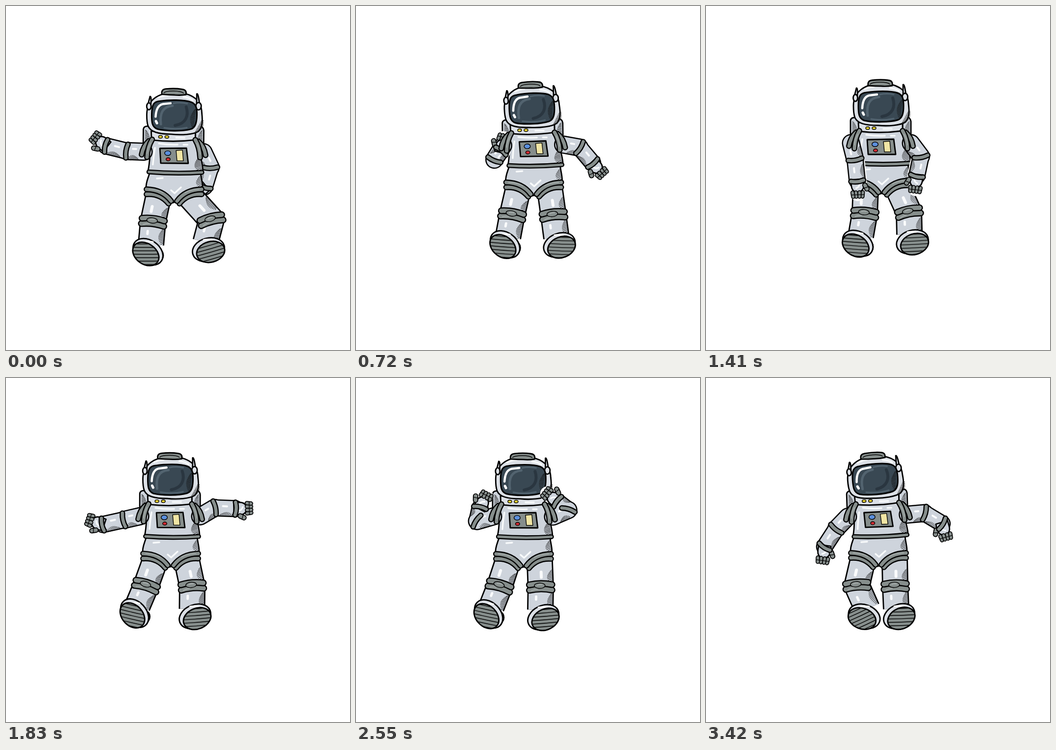
An HTML page that plays this animation: 700x700 px, repeating every 3450 ms.

```html
<!DOCTYPE html>
<html lang="en">
<head>
<meta charset="utf-8">
<title>Dancing astronaut</title>
<style>
html, body { margin: 0; width: 100%; height: 100%; overflow: hidden; background: #fff; }
svg { display: block; width: 100vw; height: 100vh; }
path, ellipse { stroke-linecap: round; stroke-linejoin: round; }
.o { stroke: #000; stroke-width: 2.8; }
.t { stroke: #000; stroke-width: 1.4; }
.n { fill: none; }
.s { fill: #ced4dc; }
.l { fill: #dce0e6; }
.g { fill: #868e8c; }
.w { fill: none; stroke: #f8fafb; stroke-width: 3.5; }
.h { fill: none; stroke: #111; stroke-width: 1; }
.b { stroke-linecap: butt; }
</style>
</head>
<body>
<svg viewBox="0 0 700 700"><defs id="parts"></defs><g id="stage"></g></svg>
<script>
const LOOP = 3450, STEP = 30, BOB = 7;
const SUIT = '#ced4dc', GRAY = '#868e8c', SHINE = '#fafbfc', GLEAM = '#a9b0af';

// Key poses: time, chest x, y, lean; knee and boot swing, left then right;
// upper arm, forearm and hand angles, left then right.
const POSES = [
  [0, 341, 305, 1, -11, -21, 43, 37, 182, 194, 218, 65, 107, 140],
  [210, 346, 295, 1, -14, -30, 24, 27, 165, 230, 236, 30, 40, 50],
  [420, 351, 286, 1, -18, -38, 5, 16, 143, 266, 255, 82, 158, 178],
  [1020, 367, 284, -4, -5, -14, 14, 25, 102, 306, 278, -51, -50, -73],
  [1410, 356, 287, 0, -2, -16, 23, 30, 76, 84, 88, 53, 102, 97],
  [2220, 322, 279, 0, -29, -57, 0, 5, 230, 271, 312, -97, -114, -118],
  [2880, 361, 288, 0, -2, -13, 6, 12, 84, 255, 237, 62, -170, -160],
  [3420, 350, 288, -4, -12, 3, 1, 9, 134, 123, 98, -5, -329, -286]];
const behindBack = t => t < 180 || (t > 2010 && t < 2400);

const path = (cls, d, extra = '') => `<path class="${cls}" d="${d}" ${extra}/>`;
const oval = (cls, x, y, rx, ry, extra = '') =>
  `<ellipse class="${cls}" cx="${x}" cy="${y}" rx="${rx}" ry="${ry}" ${extra}/>`;
const line = (d, w, color, cls = 'n') => path(cls, d, `stroke="${color}" stroke-width="${w}"`);
const tube = (d, w, rim = 2.4) => line(d, w + 2 * rim, '#000') + line(d, w, GRAY);
const place = (x, y, turn, body, scale = '') =>
  `<g transform="translate(${x} ${y}) rotate(${turn}) ${scale}">${body}</g>`;
const use = id => `<use href="#${id}"/>`;
const bent = (...pts) => 'M' + pts.map(p => p.join(' ')).join('L');
const angle = (a, b) => Math.atan2(b[1] - a[1], b[0] - a[0]) * 180 / Math.PI;
const polar = (p, deg, r) => [p[0] + r * Math.cos(deg * Math.PI / 180), p[1] + r * Math.sin(deg * Math.PI / 180)];

// Part of the line a-b, moved sideways.
function edge(a, b, from, to, off) {
  const dx = b[0] - a[0], dy = b[1] - a[1], n = off / (Math.hypot(dx, dy) || 1);
  return [from, to].map(f => [a[0] + dx * f + dy * n, a[1] + dy * f - dx * n]);
}

// Slanted pen strokes along a-b, longest in the middle.
function hatch([a, b], w) {
  const count = Math.ceil(Math.hypot(b[0] - a[0], b[1] - a[1]) / 3);
  let d = '';
  for (let i = 0; i <= count; i++) {
    const u = i / count, len = w * (.4 + .6 * Math.sin(Math.PI * u));
    d += bent(edge(a, b, u, u, 0)[0], edge(a, b, u + 1 / count, u, len)[0]);
  }
  return path('h', d);
}

function drawParts() {
  const cuff = tube('M-50 -30Q-62 -20 -65 -2', 7) + tube('M-44 -33Q-53 -18 -54 3', 7) +
    line('M-47 -26Q-53 -16 -54 -4', 1.6, GLEAM);
  const fingers = [-11, -3.8, 3.8, 11].map(y =>
    tube(`M25 ${y}L34 ${y * .9}`, 5.5, 1.8) + path('t n', `M30 ${y - 3}V${y + 3}`)).join('');
  const parts = {
    pack:
      path('o s', 'M-62 -22V-54Q-61 -60 -54 -60H-44V-22Z') + path('o s', 'M44 -22V-60H55Q60 -59 61 -52V-24Z') +
      hatch([[-58, -52], [-58, -26]], 9) + hatch([[58, -52], [58, -26]], -9),
    pelvis:
      path('o s', 'M-48 -63C-51 -50 -57 -42 -56 -28L-30 -16L0 0L30 -16L59 -30C59 -44 55 -52 55 -63Z') +
      path('w', 'M-5 -25L2 -19L15 -31') + path('w', 'M-34 -49L-22 -50') + hatch([[54, -54], [57, -34]], -10),
    chest:
      path('o s', 'M-44 -36C-50 -20 -46 8 -52 32Q5 38 60 32C60 12 50 -10 47 -36Z') +
      path('w', 'M-38 -16Q-41 2 -42 18') + path('w', 'M-30 -25Q-10 -22 8 -23') + path('w', 'M20 -23H28') +
      hatch([[53, 2], [58, 29]], -13) +
      path('o l', 'M-46 -50L-45 -32Q0 -27 44 -33V-50Z') + path('w', 'M5 -37H22') +
      tube('M-50 33Q5 37 58 33', 5) +
      path('o g', 'M-28 -15L26 -16L30 15L-26 15Z') +
      oval('t', -12, -5.5, 6.3, 4.8, 'fill="#5b8fdc"') + oval('t', -11, 7, 4.3, 3.2, 'fill="#d22c33"') +
      path('t', 'M5 -11L18 -12L20 10L7 10Z', 'fill="#f0e5a4"') +
      oval('t', -27, -38.5, 4, 2.8, 'fill="#e9d233"') + oval('t', -14, -38.5, 4, 2.8, 'fill="#e9d233"'),
    cuff,
    head:
      path('o l', 'M-56 -2C-56 -30 -34 -47 2 -47C36 -47 55 -32 56 -6C58 10 58 22 50 31C40 38 15 40 -6 38C-32 38 -48 34 -53 22C-56 14 -56 6 -56 -2Z') +
      path('w', 'M-33 -36Q-22 -41 -14 -41') + path('w', 'M18 -38Q30 -37 37 -32') +
      hatch([[42, 34], [55, 10]], -9) +
      path('o g', 'M-26 -43Q-28 -53 -18 -54Q0 -56 15 -54Q25 -53 23 -43Q12 -41 0 -42Q-14 -42 -26 -43Z') +
      path('t n', 'M-22 -46Q-18 -50 -2 -50Q14 -50 18 -46') +
      path('o l', 'M-54 -22L-50 -38Q-47 -39 -48 -22Z') + oval('o l', -52, -18, 4.5, 7) +
      path('o l', 'M45 -24L45 -45Q48 -47 51 -24Z') + oval('o l', 49, -20, 5.5, 7.5) +
      path('', 'M-46 -2C-46 -22 -42 -28 -30 -29C-12 -32 20 -33 34 -28C45 -24 46 -14 46 -2C46 12 44 24 34 27C18 32 -18 32 -34 28C-45 24 -46 14 -46 -2Z',
        'fill="#394853" stroke="#000" stroke-width="3"') +
      line('M-27 18C-30 -4 -24 -18 -4 -20', 5, '#52636f') + line('M-2 -25Q12 -28 26 -25', 3, '#52636f') +
      line('M24 -18C30 0 24 16 2 20', 6, '#2a3640') + line('M-20 25Q5 29 26 24', 3, '#52636f') +
      hatch([[44, -14], [40, 20]], -9) +
      line('M-38 3Q-37 -20 -24 -23L-8 -25', 4.5, '#fff') + line('M-37 12L-35 16', 5, '#fff'),
    knee:
      tube('M-23 6Q0 1 23 6', 9) + tube('M-23 -5Q0 -10 23 -5', 9) +
      line('M-19 7Q-12 4 -6 4', 1.6, GLEAM) + oval('t g', -2, -3, 11, 5.5) + line('M-7 -4Q-2 -6 3 -5', 1.8, GLEAM),
    ring:
      tube('M-24 -3Q4 -5 21 16', 7) + tube('M-24 -13Q9 -12 26 11', 7) + line('M-19 -13Q0 -12 10 -6', 1.6, GLEAM),
    halo: line('M2 0H28', 31, '#fff'),
    hand:
      path('o s', 'M-3 -13L9 -14Q23 -13 25 0Q23 13 9 13L-3 13Z') + path('w', 'M8 -5Q14 -3 16 3') +
      fingers + tube('M10 -16L18 -20', 7.5, 2) + path('t n', 'M14 -22L16 -15')
  };
  document.getElementById('parts').innerHTML =
    Object.entries(parts).map(([id, body]) => `<g id="${id}">${body}</g>`).join('');
}

// Smooth curve through the key poses, with a small dip between beats.
function poseAt(t) {
  const last = POSES.length - 1;
  let i = 0;
  while (i < last - 1 && t >= POSES[i + 1][0]) i++;
  const a = POSES[i], b = POSES[i + 1], p = POSES[Math.max(0, i - 1)], q = POSES[Math.min(last, i + 2)];
  const span = b[0] - a[0], u = (t - a[0]) / span, v = 1 - u;
  const pose = a.map((from, k) => {
    const ma = (b[k] - p[k]) / (b[0] - p[0]) * span, mb = (q[k] - from) / (q[0] - a[0]) * span;
    return from * (1 + 2 * u) * v * v + ma * u * v * v + b[k] * u * u * (3 - 2 * u) - mb * u * u * v;
  });
  pose[2] += BOB * Math.sin(Math.PI * u) ** 2;
  return pose;
}

function leg(side, crotch, kneeX, bootX) {
  const hip = [crotch[0] + (side < 0 ? -31 : 34), crotch[1] - 12];
  const knee = [hip[0] + kneeX, hip[1] + 53 - .13 * Math.abs(kneeX)];
  const x = hip[0] + bootX, y = hip[1] + Math.sqrt(115 ** 2 - bootX ** 2) - 1;
  const foot = [x - side * 6, y - 15];
  const tilt = side < 0 ? 22 - .6 * bootX : .35 * bootX - 28;
  const tread = side * (bootX - kneeX) - 10;
  const rx = 34.5, ry = 25, sx = side * 4.5, sy = 4.5, clip = side < 0 ? 'soleL' : 'soleR';
  const sole = cls => oval(cls, sx, sy, rx * .84, ry * .84, `transform="rotate(${tilt} ${sx} ${sy})"`);
  let treads = '';
  for (let i = -4; i <= 4; i++) treads += `M-40 ${i * 7}Q0 ${i * 7 + 1.5} 40 ${i * 7}`;
  const boot =
    oval('o g', -side * 23, 7, 8, 11) +
    oval('o l', 0, 0, rx - 1.4, ry - 1.4, `transform="rotate(${tilt})"`) +
    line(`M${-side * 10} ${-ry * .8}q${side * 10} -2 ${side * 18} 1`, 3, '#fff') +
    `<clipPath id="${clip}">${sole('g')}</clipPath>` + sole('o g') +
    `<g clip-path="url(#${clip})">${place(sx, sy, tread, path('t n', treads))}</g>`;
  const limb = bent(hip, knee, foot);
  return line(limb, 54, '#000', 'n b') + line(limb, 48.5, SUIT, 'n b') +
    hatch(edge(hip, knee, .35, .8, 24), -10) + hatch(edge(knee, foot, .25, .9, 24), -10) +
    line(bent(...edge(hip, knee, .42, .62, side < 0 ? -8 : 2)), 6, SHINE) +
    line(bent(...edge(knee, foot, .42, .55, -9)), 5, SHINE) +
    place(...knee, (angle(hip, foot) - 90) * .8, use('knee')) + place(x, y, 0, boot);
}

function arm(side, chest, up, low, turn) {
  const S = polar(polar(chest, chest[2], side * 61), chest[2] - 90, 8);
  const E = polar(S, up, 34);
  const W = polar(E, low, 33 + 11 * Math.cos((low - up) * Math.PI / 180));
  const upper = bent(S, E), fore = bent(E, W), flip = `scale(.95 ${-side * .95})`;
  return line(fore, 39, '#fff') + place(...W, turn, use('halo'), flip) +
    line(upper, 37, '#000') + line(fore, 35, '#000') +
    line(upper, 32, SUIT) + line(fore, 30, SUIT) +
    hatch(edge(S, E, .3, .85, -side * 16), side * 8) + hatch(edge(E, W, .25, .8, -side * 15), side * 7) +
    line(bent(...edge(S, E, .45, .65, side * 5)), 4, SHINE) +
    line(bent(...edge(E, W, .4, .6, side * 4)), 4, SHINE) +
    place(...W, turn, use('hand'), flip) +
    place(...E, angle(S, W), tube('M0 -14Q4 0 0 14', 6.5)) +
    place(...W, low, tube('M0 -13Q4 0 0 13', 6.5));
}

const stage = document.getElementById('stage');

function draw(t) {
  const [, x, y, lean, kneeL, bootL, kneeR, bootR, ...arms] = poseAt(t);
  const chest = [x, y, lean / 2], crotch = [x, y + 95];
  const head = [...polar([x, y], lean - 90, 82), lean];
  const armL = arm(-1, chest, ...arms.slice(0, 3)), armR = arm(1, chest, ...arms.slice(3));
  const hidden = behindBack(t);
  stage.innerHTML =
    place(...chest, use('pack')) + (hidden ? armR : '') +
    leg(-1, crotch, kneeL, bootL) + leg(1, crotch, kneeR, bootR) +
    place(...crotch, 0, use('pelvis')) +
    place(x - 31, crotch[1] - 14, 0, use('ring')) +
    place(x + 33, crotch[1] - 14, 0, use('ring'), 'scale(-1 1)') +
    place(...chest, use('chest')) + place(...head, use('head')) +
    (hidden ? '' : armR) + place(...chest, use('cuff'), 'scale(-1 1)') +
    armL + place(...chest, use('cuff'));
}

let shown = -1;
function tick(now) {
  const t = Math.floor(now % LOOP / STEP) * STEP;
  if (t !== shown) draw(shown = t);
  requestAnimationFrame(tick);
}
drawParts();
draw(0);
requestAnimationFrame(tick);
</script>
</body>
</html>
```
